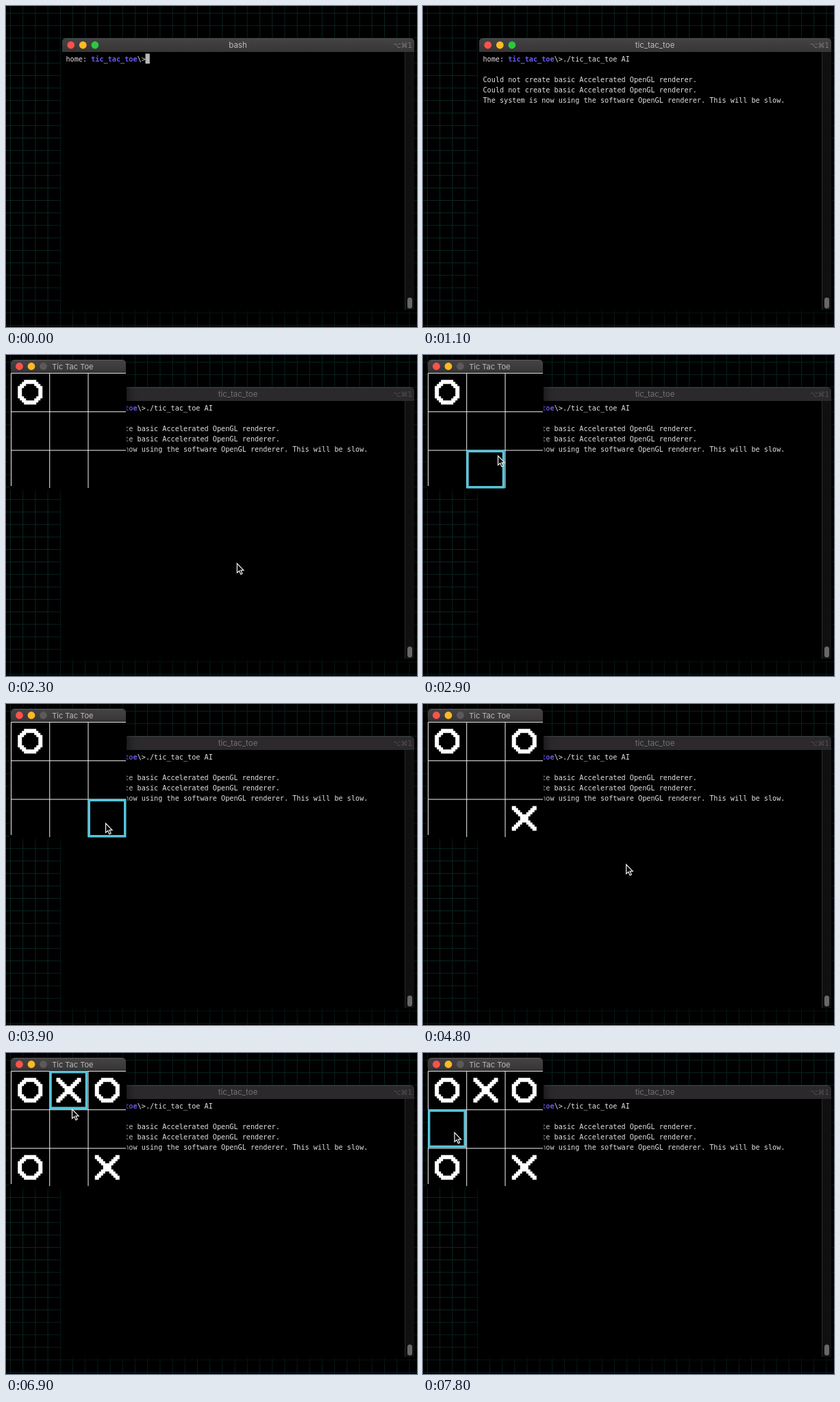
Write an HTML page that moves like this. It is 600x468 px and loops after 8 s.

```html
<!DOCTYPE html>
<html lang="en">
<head>
<meta charset="utf-8">
<title>Tic Tac Toe</title>
<style>
  html, body { margin: 0; width: 100%; height: 100%; overflow: hidden; background: #000; }
  svg { display: block; width: 600px; height: 468px; }
  text { white-space: pre; }
  .title { font: 11.5px Inter, "Open Sans", sans-serif; text-anchor: middle; fill: #bcbabb; }
  #game .title { font-size: 11px; }
  .keys { font: 10px "DejaVu Sans", sans-serif; fill: #7d7b7c; }
  .term { font: 10.18px "DejaVu Sans Mono", monospace; fill: #e2e2e2; }
  .dir { font-weight: bold; fill: #6c5cf6; }
  .blurred .bar { fill: #2b292b; }
  .blurred .title { fill: #727071; }
  .blurred .keys { fill: #535152; }
</style>
</head>
<body>
<svg viewBox="0 0 600 468">
  <defs>
    <pattern id="mesh" x="6" y="10" width="18.2" height="18.2" patternUnits="userSpaceOnUse">
      <path d="M.5 0V18.2M0 .5H18.2" stroke="#0b2d2b" fill="none"/>
    </pattern>
    <linearGradient id="bar" x2="0" y2="1">
      <stop stop-color="#454344"/><stop offset="1" stop-color="#373536"/>
    </linearGradient>
    <linearGradient id="fade" x2="0" y2="1">
      <stop stop-opacity=".3"/><stop offset=".15" stop-opacity=".15"/>
      <stop offset=".6" stop-opacity=".1"/><stop offset="1" stop-opacity=".3"/>
    </linearGradient>
    <filter id="soft" x="-20%" y="-20%" width="140%" height="140%"><feGaussianBlur stdDeviation="8"/></filter>
  </defs>

  <rect width="600" height="468" fill="url(#mesh)"/>
  <rect width="600" height="468" fill="url(#fade)"/>

  <g id="terminal">
    <rect x="82" y="54" width="514" height="396" filter="url(#soft)" opacity=".7"/>
    <path d="M81 60H596V443H81Z"/>
    <path class="bar" d="M82 67V52a5 5 0 0 1 5-5H591a5 5 0 0 1 5 5V67Z" fill="url(#bar)"/>
    <path d="M87 47.5H591" stroke="#5a5859" opacity=".6"/>
    <circle cx="94.7" cy="57" r="5.4" fill="#f9524c"/>
    <circle cx="112.3" cy="57" r="5.4" fill="#fdb924"/>
    <circle cx="129.9" cy="57" r="5.4" fill="#2bc840"/>
    <text id="job" class="title" x="338.5" y="61">bash</text>
    <text class="keys" x="565" y="61">⌥⌘1</text>
    <path d="M582 67H596V443H582Z" fill="#101010"/>
    <path d="M582.5 67V443" stroke="#292929"/>
    <rect x="586" y="425" width="7" height="16" rx="3.5" fill="#686868"/>
    <rect id="block" y="69.5" width="6.3" height="14.5" fill="#b9b9b9"/>
    <text class="term" x="87.5" y="80.5">home: <tspan class="dir">tic_tac_toe</tspan>\&gt;<tspan id="typed"></tspan></text>
    <g id="output" class="term">
      <text x="87.5" y="110.5">Could not create basic Accelerated OpenGL renderer.</text>
      <text x="87.5" y="125.5">Could not create basic Accelerated OpenGL renderer.</text>
      <text x="87.5" y="140.5">The system is now using the software OpenGL renderer. This will be slow.</text>
    </g>
  </g>

  <g id="game">
    <rect x="7" y="12" width="168" height="187" filter="url(#soft)" opacity=".75"/>
    <path d="M6 20H176V196H6Z"/>
    <path d="M7 25.5V12a5 5 0 0 1 5-5H170a5 5 0 0 1 5 5V25.5Z" fill="url(#bar)"/>
    <path d="M12 7.500H170" stroke="#656364" opacity=".7"/>
    <circle cx="19.5" cy="16.5" r="5.4" fill="#f9524c"/>
    <circle cx="37" cy="16.5" r="5.4" fill="#fdb924"/>
    <circle cx="54.5" cy="16.5" r="5.4" fill="#5b595a"/>
    <text class="title" x="97.3" y="20.5">Tic Tac Toe</text>
    <g id="board">
      <path d="M7.5 191V26.5H175M63.75 26V194M120 26V194M7 82.75H175M7 139H175" fill="none" stroke="#f4f4f4"/>
      <g id="marks" fill="#fff"></g>
      <rect id="hover" width="52.5" height="52.5" fill="none" stroke="#58c4da" stroke-width="3.5"/>
    </g>
  </g>

  <path id="mouse" d="M0 0V13.5L3.2 10.7L5.4 15.8L7.7 14.8L5.5 9.9H9.6Z" fill="#0c0c0c" stroke="#f0f0f0" stroke-width="1.2"/>
</svg>
<script>
  const LOOP = 8000, STEP = 100, CELL = 56.25, PIXEL = 3, LEFT = 7, TOP = 26;
  const RUN = 900, OPEN = 1200, POINTER = 1300, READY = 2300;
  const COMMAND = "./tic_tac_toe AI";
  const TYPED = [0, 1, 2, 3, 4, 14, 15, 16];  // tab completion after "./ti"

  // Upper halves, mirrored downwards
  const SPRITES = {
    O: ["...######...", "..########..", ".###....###.", "###......###", "##........##", "##........##"],
    X: ["##........##", "###......###", ".###....###.", "..###..###..", "...######...", "....####...."],
  };
  // mark, column, row, time
  const MOVES = [
    ["O", 0, 0, READY], ["X", 2, 2, 4200], ["O", 2, 0, 4600],
    ["X", 1, 0, 5600], ["O", 0, 2, 6000],
  ];
  // time, x, y of the pointer tip
  const PATH = [
    [1300, 350, 300], [1500, 353, 310], [1700, 408, 358], [1900, 412, 362],
    [2100, 412, 362], [2400, 300, 275], [2700, 140, 165], [2900, 109.5, 147],
    [3000, 110, 145], [3100, 160, 128], [3200, 252, 105], [3300, 252, 105],
    [3500, 235, 85], [3700, 180, 125], [3900, 145.5, 174], [4200, 145.5, 174],
    [4500, 360, 270], [4700, 355, 265], [5000, 180, 172], [5100, 148, 130],
    [5300, 98.5, 67], [6800, 98.5, 67], [6900, 96.5, 82], [7100, 98, 118],
    [7300, 98, 118], [7800, 46, 116],
  ];

  const $ = id => document.getElementById(id);
  const show = (el, on) => el.setAttribute("visibility", on ? "inherit" : "hidden");
  const place = (el, x, y) => el.setAttribute("transform", `translate(${x} ${y})`);

  function spritePath(half) {
    return [...half, ...[...half].reverse()].map((row, y) =>
      [...row.matchAll(/#+/g)].map(({ 0: run, index }) =>
        `M${index * PIXEL} ${y * PIXEL}h${run.length * PIXEL}v${PIXEL}h${-run.length * PIXEL}z`
      ).join("")).join("");
  }

  const marks = MOVES.map(([mark, col, row, time]) => {
    const el = document.createElementNS("http://www.w3.org/2000/svg", "path");
    el.setAttribute("d", spritePath(SPRITES[mark]));
    place(el, LEFT + 10.25 + col * CELL, TOP + 10.25 + row * CELL);
    $("marks").append(el);
    return { el, time };
  });

  function pointerAt(t) {
    const i = PATH.findIndex(p => p[0] > t);
    if (i === 0) return PATH[0].slice(1);
    if (i < 0) return PATH[PATH.length - 1].slice(1);
    const [t0, x0, y0] = PATH[i - 1], [t1, x1, y1] = PATH[i];
    const k = (t - t0) / (t1 - t0);
    return [x0 + (x1 - x0) * k, y0 + (y1 - y0) * k];
  }

  function draw(t) {
    const count = TYPED[Math.min(t / STEP, TYPED.length - 1)];
    $("typed").textContent = COMMAND.slice(0, count);
    $("block").setAttribute("x", 203.5 + count * 6.13);
    show($("block"), t < RUN);
    show($("output"), t >= RUN);
    $("job").textContent = t < RUN ? "bash" : "tic_tac_toe";
    $("terminal").classList.toggle("blurred", t >= OPEN);
    show($("game"), t >= OPEN);
    show($("board"), t >= READY);
    for (const { el, time } of marks) show(el, t >= time);

    const [x, y] = pointerAt(t);
    const col = Math.floor((x - LEFT) / CELL), row = Math.floor((y - TOP) / CELL);
    const inside = Math.min(col, row) >= 0 && Math.max(col, row) < 3;
    show($("hover"), inside && t >= READY);
    place($("hover"), LEFT + 1.75 + col * CELL, TOP + 1.75 + row * CELL);
    show($("mouse"), t >= POINTER);
    place($("mouse"), x, y);
  }

  function tick() {
    const t = performance.now() % LOOP;
    draw(Math.floor(t / STEP) * STEP);
    requestAnimationFrame(tick);
  }
  tick();
</script>
</body>
</html>
```
